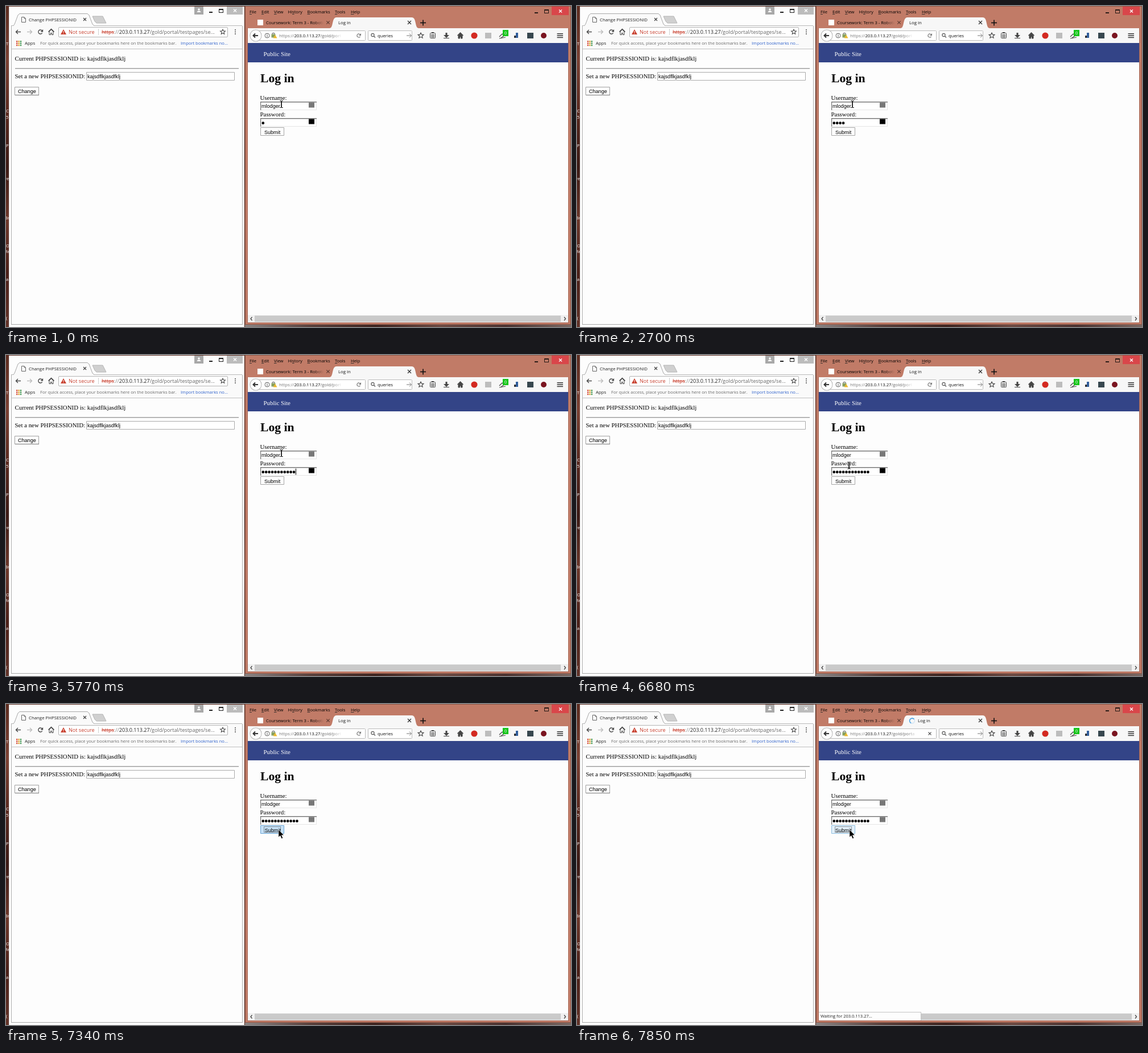
Write an HTML page with a canvas that moves like this. It is 993x564 px and loops after 8 s.

```html
<!DOCTYPE html>
<html lang="en">
<head>
<meta charset="utf-8">
<title>Session demo</title>
<style>
html, body { margin: 0; width: 100%; height: 100%; overflow: hidden; background: #fdfdfd; }
canvas { display: block; }
</style>
</head>
<body>
<canvas id="stage" width="993" height="564"></canvas>
<script>
const LOOP = 8000;
const HOST = "203.0.113.27";
const UI = "'Open Sans', 'Noto Sans', sans-serif";
const SERIF = "'Liberation Serif', serif";
const SANS = "'Liberation Sans', sans-serif";
const PAGE = "#fdfdfd", FRAME = "#c17b67", EDGE = "#8d5747", INK = "#222";

const stage = document.getElementById("stage");
let g = stage.getContext("2d");

function rect(x, y, w, h, fill) {
  g.fillStyle = fill;
  g.fillRect(x, y, w, h);
}

function box(x, y, w, h, fill, stroke, r = 0) {
  g.beginPath();
  g.roundRect(x + .5, y + .5, w - 1, h - 1, r);
  g.fillStyle = fill;
  g.fill();
  g.strokeStyle = stroke;
  g.lineWidth = 1;
  g.stroke();
}

function poly(points, fill, stroke, width = 1) {
  g.beginPath();
  points.forEach(([x, y], i) => i ? g.lineTo(x, y) : g.moveTo(x, y));
  if (fill) { g.closePath(); g.fillStyle = fill; g.fill(); }
  if (stroke) { g.strokeStyle = stroke; g.lineWidth = width; g.stroke(); }
}

const line = (x1, y1, x2, y2, color, width = 1) => poly([[x1, y1], [x2, y2]], null, color, width);

function disc(x, y, r, fill) {
  g.beginPath();
  g.arc(x, y, r, 0, 7);
  g.fillStyle = fill;
  g.fill();
}

function arc(x, y, r, from, to, color, width = 1) {
  g.beginPath();
  g.arc(x, y, r, from, to);
  g.strokeStyle = color;
  g.lineWidth = width;
  g.stroke();
}

function text(s, x, y, size, color = INK, family = UI, weight = "") {
  g.font = `${weight} ${size}px ${family}`;
  g.fillStyle = color;
  g.fillText(s, x, y);
}

function fade(x1, x2, color) {
  const f = g.createLinearGradient(x1, 0, x2, 0);
  f.addColorStop(0, color);
  f.addColorStop(1, color + "00");
  return f;
}

function cross(x, y, r, color, width = 1) {
  line(x - r, y - r, x + r, y + r, color, width);
  line(x - r, y + r, x + r, y - r, color, width);
}

function winButtons(minX, maxX, y, color) {
  rect(minX - 3, y + 2, 6, 2, color);
  g.strokeStyle = color;
  g.lineWidth = 1;
  g.strokeRect(maxX - 3.5, y - 2.5, 7, 6);
  rect(maxX - 4, y - 3, 8, 2, color);
}

function star(x, y, r, color) {
  const pts = [];
  for (let i = 0; i <= 10; i++) {
    const a = i * Math.PI / 5 - Math.PI / 2, d = i % 2 ? r * .45 : r;
    pts.push([x + d * Math.cos(a), y + d * Math.sin(a)]);
  }
  poly(pts, null, color, 1.1);
}

function arrow(x, y, dir, color, width = 1.4) {
  line(x - 4, y, x + 4, y, color, width);
  poly([[x + dir, y - 3.5], [x + dir * 4.5, y], [x + dir, y + 3.5]], null, color, width);
}

function reload(x, y, r, color, width) {
  arc(x, y, r, .5, 5.5, color, width);
  poly([[x + r + 1, y - r - 1], [x + r + 1, y], [x, y]], color);
}

function home(x, y, fill, stroke) {
  poly([[x - 5, y], [x, y - 5], [x + 5, y]], null, stroke, 1.5);
  poly([[x - 3.5, y - .5], [x, y - 4], [x + 3.5, y - .5], [x + 3.5, y + 5], [x + 1, y + 5],
    [x + 1, y + 2], [x - 1, y + 2], [x - 1, y + 5], [x - 3.5, y + 5], [x - 3.5, y - .5]], fill, stroke);
}

function desktop() {
  let d = g.createLinearGradient(0, 0, 0, 564);
  ["#5c2c20", "#7c4234", "#5a2a20", "#3c1b16", "#6e392c", "#4b211a", "#63342a"]
    .forEach((c, i) => d.addColorStop(i / 6, c));
  rect(0, 0, 993, 564, d);
  d = g.createLinearGradient(420, 0, 993, 0);
  ["#8a8484", "#59403c", "#3d2420", "#6c4a43", "#4a3230", "#7b6964"]
    .forEach((c, i) => d.addColorStop(i / 5, c));
  rect(420, 556, 573, 8, d);
  const labels = [["T", 69], ["C", 187], ["5", 198], ["P", 248], ["re", 306],
    ["Br", 375], ["O", 424], ["Re", 434], ["a", 483], ["(", 551]];
  for (const [s, y] of labels) text(s, s.length > 1 ? -2 : 0, y, 7.6, "#fff");
}

function leftWindow() {
  rect(5, 1, 414, 563, PAGE);
  rect(5, 1, 1, 563, "#dedede");
  rect(418, 1, 1, 563, "#dedede");

  // Title bar and tabs
  rect(331, 1, 16, 14, "#a8a8a8");
  disc(339, 6, 1.8, "#fff");
  poly([[335.5, 11], [337, 8.5], [341, 8.5], [342.5, 11]], "#fff");
  winButtons(360, 378, 8, INK);
  rect(388, 1, 28, 14, "#bcbcbc");
  cross(402.5, 8, 2.5, "#fff", 1.3);
  poly([[152, 18], [170, 18], [176, 30], [159, 30], [156, 27]], "#d0d0d0", "#b5b5b5");
  line(9, 34.5, 415, 34.5, "#b8b8b8");
  const tab = [[13, 34.5], [15, 32], [21, 16], [24, 13.5], [143, 13.5], [146, 16], [152, 32], [155, 34.5]];
  poly(tab, "#fafafa");
  poly(tab, null, "#a8a8a8");
  line(14, 34.5, 154, 34.5, "#fafafa");
  poly([[28, 19.5], [32, 19.5], [34.5, 22], [34.5, 28.5], [27.5, 28.5], [27.5, 19.5], [32, 19.5], [32, 22], [34.5, 22]], null, "#666");
  text("Change PHPSESSIONID", 40, 26.5, 7.82, "#222");
  cross(138.5, 23.5, 2.5, "#444", 1.2);

  // Toolbar
  rect(10, 35, 405, 40, "#fafafa");
  arrow(22, 45.5, -1, "#444");
  arrow(41, 45.5, 1, "#bbb");
  reload(60.5, 45.5, 3.6, "#444", 1.4);
  home(79.5, 45.5, "#fafafa", "#444");
  box(92, 37, 298, 18, "#fff", "#b5b5b5", 1.5);
  poly([[101, 41], [106, 50], [96, 50]], "#c8402f");
  rect(100.5, 44, 1, 3, "#fff");
  rect(100.5, 48, 1, 1, "#fff");
  text("Not secure", 110, 49, 9.06, "#c8402f");
  rect(162, 40, 1, 11, "#d0d0d0");
  text("https", 168, 49, 9.06, "#c8402f");
  const w = g.measureText("https").width;
  text("://", 168 + w, 49, 9.06, "#888");
  const w2 = w + g.measureText("://").width;
  line(168, 46, 168 + w, 46, "#c8402f");
  text(HOST, 168 + w2, 49, 9.06, "#222");
  const w3 = w2 + g.measureText(HOST).width;
  text("/gold/portal/testpages/se...", 168 + w3, 49, 9.06, "#666");
  star(381, 45.5, 4.6, "#444");
  for (const y of [42, 45.5, 49]) disc(403, y, 1, "#444");

  // Bookmarks
  const dots = ["#d9503f", "#e0a52c", "#4b9a55", "#4a78d0"];
  for (let i = 0; i < 9; i++) rect(18 + i % 3 * 3.4, 61 + (i / 3 | 0) * 3.4, 2.4, 2.4, dots[(i + (i / 3 | 0)) % 4]);
  text("Apps", 33, 68, 7.8, "#222");
  text("For quick access, place your bookmarks here on the bookmarks bar.", 60, 68, 7.57, "#6c6c6c");
  text("Import bookmarks no...", 307, 68, 7.57, "#2f62cc");
  line(9, 75.5, 415, 75.5, "#c0c0c0");

  // Page
  rect(10, 76, 405, 483, PAGE);
  rect(9, 35, 1, 525, "#b0b0b0");
  rect(415, 35, 1, 525, "#b0b0b0");
  rect(9, 559, 407, 1, "#a8a8a8");
  text("Current PHPSESSIONID is: kajsdflkjasdfklj", 15.5, 96, 10.88, "#000", SERIF);
  rect(16, 109, 393, 1.4, "#9a9a9a");
  text("Set a new PHPSESSIONID:", 15.5, 127, 10.88, "#000", SERIF);
  box(141, 116, 261, 15, "#fff", "#aaa");
  text("kajsdflkjasdfklj", 143, 126.5, 9.07, "#000", SANS);
  box(15, 142, 43, 15, PAGE, "#a0a0a0");
  rect(16, 156, 42, 1, "#777");
  text("Change", 21, 153, 9.07, "#000", SANS);
}

function rightWindow() {
  box(420, 0, 573, 560, FRAME, EDGE);
  rect(424, 39, 565, 518, "#a96a58");

  const menu = [["File", 428, 0], ["Edit", 449, 0], ["View", 471, 0], ["History", 495.5, 2],
    ["Bookmarks", 529.5, 0], ["Tools", 578, 0], ["Help", 606, 0]];
  for (const [s, x, key] of menu) {
    text(s, x, 12.5, 7.6, "#000");
    const from = x + g.measureText(s.slice(0, key)).width;
    rect(from, 14, g.measureText(s[key]).width, .8, "#222");
  }
  winButtons(932, 950, 9, "#2a1b17");
  rect(959, 1, 30, 15, "#d9464a");
  cross(974.5, 9, 2.5, "#fff", 1.3);

  // Tab strip
  rect(442, 24, 10, 10, "#fff");
  g.save();
  g.beginPath();
  g.rect(456, 20, 102, 18);
  g.clip();
  text("Coursework: Term 3 - Robotic", 457, 32, 7.6, fade(541, 559, "#000000"));
  g.restore();
  cross(566, 29, 2.7, "#5a3930", 1.1);
  g.beginPath();
  g.moveTo(569, 39);
  g.bezierCurveTo(576, 38, 572, 20, 581, 20);
  g.lineTo(713, 20);
  g.bezierCurveTo(722, 20, 718, 38, 725, 39);
  g.closePath();
  g.fillStyle = "#f7f7f7";
  g.fill();
  cross(709, 29, 3, "#333", 1.2);
  line(728, 29.5, 738, 29.5, "#111", 1.6);
  line(733, 24.5, 733, 34.5, "#111", 1.6);

  // Toolbar
  rect(425, 39, 563, 26, "#f7f7f7");
  box(444, 43, 188, 18, "#fff", "#bbb", 1);
  disc(439, 52, 10.5, "#aaa");
  disc(439, 52, 9.7, "#fcfcfc");
  arrow(439, 52, -1, "#333", 2);
  arc(459, 52, 4, 0, 7, "#666");
  rect(458.5, 51, 1, 3.5, "#555");
  rect(458.5, 49, 1, 1, "#555");
  arc(470, 49.5, 2.2, Math.PI, 0, "#777", 1.2);
  rect(466.5, 49.5, 7, 6, "#88a060");
  poly([[473, 50.5], [476.5, 56.5], [469.5, 56.5]], "#ecb92d");
  box(636, 43, 78, 18, "#fff", "#bbb", 1);
  arc(644.5, 51, 2.6, 0, 7, "#555", 1.1);
  line(646.5, 53, 649, 55.5, "#555", 1.2);
  text("queries", 653, 55, 7.75, "#111");
  arrow(708, 52, 1, "#777", 1);

  star(729, 52, 5.2, "#444");
  box(745, 47, 10, 10, "#f7f7f7", "#444", 1);
  rect(748, 46, 4, 2, "#444");
  for (const y of [50, 52, 54]) rect(747, y, 6, 1, "#444");
  rect(772.5, 47, 3, 5, "#444");
  poly([[769, 51], [779, 51], [774, 56]], "#444");
  rect(769, 56, 10, 1, "#444");
  home(798.5, 52, "#444", "#444");
  disc(823, 52, 5.6, "#d32a22");
  rect(842, 47, 11, 10, "#bdbdbd");
  poly([[867, 54], [872, 49], [876, 52], [870, 56]], null, "#444", 1.2);
  line(867, 57, 878, 55, "#444");
  rect(873, 42, 10, 11, "#18c51c");
  text("0", 876, 50, 7.2, "#fff");
  rect(893, 52, 3, 4, "#333");
  rect(896, 47, 4, 9, "#315e9c");
  rect(916, 47, 11, 10, "#37474f");
  disc(945, 52, 5, "#7a1420");
  for (const y of [48, 51.3, 54.6]) rect(968.5, y, 10.5, 1.5, "#333");

  // Page
  rect(425, 65, 563, 491, PAGE);
  rect(425, 65, 563, 34, "#334487");
  text("Public Site", 452.5, 87.5, 10.88, "#fff", SERIF);
  text("Log in", 447, 134, 21.7, "#000", SERIF, "bold");
  text("Username:", 446.5, 164.5, 10.88, "#000", SERIF);
  text("Password:", 446.5, 194, 10.88, "#000", SERIF);
  for (const y of [168, 197]) {
    rect(447, y, 99, 15, "#e6e6e6");
    rect(448, y + 1, 97, 13, "#fff");
    rect(447, y, 99, 1.4, "#707070");
    rect(447, y, 1.2, 15, "#707070");
  }
  text("mlodger", 449, 179.2, 9.07, "#000", SANS);
  rect(532, 169.5, 10, 9, "#777");

  // Scroll bar
  rect(425, 543, 563, 13, "#f0f0f0");
  rect(437, 544, 538, 11, "#cacaca");
  poly([[432.5, 546.5], [430, 549.5], [432.5, 552.5]], null, "#444", 1.3);
  poly([[981, 546.5], [983.5, 549.5], [981, 552.5]], null, "#444", 1.3);
}

// Start time, dots typed, caret shown
const typing = [[0, 1, 0], [400, 2, 1], [540, 2, 0], [930, 3, 1], [1080, 3, 0], [1610, 3, 1], [2160, 3, 0],
  [2700, 4, 0], [3280, 5, 0], [3780, 5, 1], [4210, 5, 0], [4460, 6, 1], [4730, 7, 0], [5100, 8, 1],
  [5370, 8, 0], [5620, 9, 1], [5770, 11, 1], [5920, 12, 0], [6040, 12, 1], [6310, 12, 0], [6830, 12, 1], [7340, 12, 0]];
// Start time, x, y
const mouse = [[0, 484, 172.5], [6680, 478, 194], [6830, 481, 215], [6950, 482, 232], [7070, 481, 228], [7190, 479, 221]];
// Start time, fill, border
const button = [[0, PAGE, "#a6a6a6"], [6830, "#eaf3fb", "#9dbdd8"], [6950, "#ebebeb", "#b0b0b0"],
  [7190, "#e2f0fb", "#86b8dd"], [7340, "#c6e1f7", "#6ba6d6"], [7490, "#e2f0fb", "#8fbfe0"]];

const at = (track, t) => track.findLast(row => row[0] <= t);

function form(t) {
  const [, count, caret] = at(typing, t);
  for (let i = 0; i < count; i++) disc(451.8 + i * 5.42, 205.7, 2.35, "#000");
  if (caret) rect(449 + Math.round(count * 5.42), 199.5, 1, 11, "#000");
  rect(532, 198.5, 10, 9, t < 6830 ? "#000" : "#777");

  const [, fill, edge] = at(button, t);
  const down = t >= 7340 && t < 7490;
  box(447, 213, 42, 15, fill, edge);
  text("Submit", down ? 454.7 : 454, down ? 225 : 224.5, 9.07, "#000", SANS);
  if (t >= 7340) {
    g.setLineDash([1, 1]);
    g.strokeStyle = "#444";
    g.lineWidth = 1;
    g.strokeRect(453.5, 215.5, 29, 10);
    g.setLineDash([]);
  }
}

function loading(t) {
  const on = t >= 7490;
  text("Log in", on ? 599 : 584, 32, 7.8, "#111");
  g.save();
  g.beginPath();
  g.rect(478, 44, on ? 116 : 110, 16);
  g.clip();
  text("https://", 480, 55, 7.75, "#777");
  const x = 480 + g.measureText("https://").width;
  text(HOST, x, 55, 7.75, "#111");
  text("/gold/portal", x + g.measureText(HOST).width, 55, 7.75, on ? fade(580, 597, "#666666") : fade(573, 591, "#666666"));
  g.restore();
  if (!on) {
    reload(620, 52, 3, "#777", 1.1);
    return;
  }
  cross(620, 52, 2.5, "#555", 1.1);
  const turn = Math.floor((t - 7850) / 120) * 1.3;
  arc(589, 29.5, 4.4, 0, 7, "#d3e6f5", 1.6);
  arc(589, 29.5, 4.4, 2 + turn, 5.6 + turn, "#4ba3e3", 1.6);
  if (t >= 7610) {
    rect(425, 541, 180, 15, "#c4c4c4");
    rect(425, 542, 179, 14, PAGE);
    text(`Waiting for ${HOST}...`, 428, 551, 7.5, "#222");
  }
}

function pointer(t) {
  const [, x, y] = at(mouse, t);
  if (t < 6830) {
    rect(x - .7, y - 5.5, 1.6, 11.5, "#000");
    for (const s of [-6, 6]) {
      rect(x - 2.5, y + s - .5, 2, 1, "#000");
      rect(x + .7, y + s - .5, 2, 1, "#000");
    }
    return;
  }
  const shape = [[0, 0], [0, 13], [3, 10.3], [5.3, 15.5], [7.6, 14.5], [5.3, 9.4], [9.3, 9.4], [0, 0]];
  poly(shape.map(([a, b]) => [x + a, y + b]), "#000", "#fff", .5);
}

// The still parts are painted once
const screen = g;
const still = document.createElement("canvas");
still.width = 993;
still.height = 564;
g = still.getContext("2d");
desktop();
leftWindow();
rightWindow();
g = screen;

const start = performance.now();
function draw(now) {
  const t = Math.max(0, now - start) % LOOP;
  g.drawImage(still, 0, 0);
  form(t);
  loading(t);
  pointer(t);
  requestAnimationFrame(draw);
}
draw(start);
</script>
</body>
</html>
```
